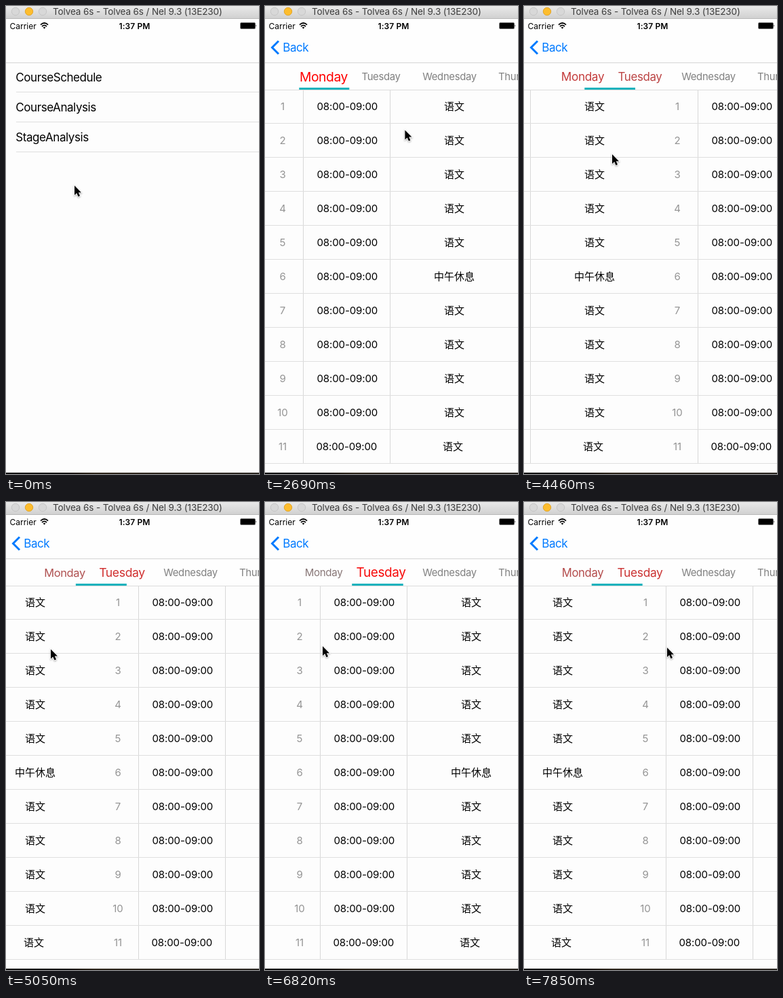
An HTML page that plays this animation: 373x688 px, repeating every 8 s.

```html
<!DOCTYPE html>
<html lang="en">
<head>
<meta charset="utf-8">
<title>Course schedule</title>
<style>
html, body { margin: 0; width: 100%; height: 100%; overflow: hidden; background: #fdfdfd; }
svg { display: block; width: 373px; height: 688px; font-family: Inter, "Noto Sans CJK SC", "Noto Sans CJK", sans-serif; }
.mid { text-anchor: middle; }
.list { font-size: 17px; letter-spacing: -.43px; }
.cell { font-size: 15px; letter-spacing: -.1px; }
.cjk { font: 15px "Noto Sans CJK SC", "Noto Sans CJK", sans-serif; }
.day { font-size: 14.8px; letter-spacing: -.3px; }
</style>
</head>
<body>
<svg id="stage" viewBox="0 0 373 688">
  <defs>
    <linearGradient id="bar" x2="0" y2="1"><stop stop-color="#e9e9e9"/><stop offset="1" stop-color="#d1d1d1"/></linearGradient>
    <linearGradient id="dock"><stop offset=".15" stop-color="#000"/><stop offset=".35" stop-color="#2e261c"/><stop offset="1" stop-color="#2c2823"/></linearGradient>
  </defs>
  <rect width="373" height="688" fill="#fdfdfd"/>
  <g id="menu"></g>
  <rect id="dim" y="84" width="373" height="602"/>
  <g id="page">
    <rect y="84" width="373" height="602" fill="#fdfdfd"/>
    <g id="schedule">
      <g id="grid"></g>
      <rect y="84" width="373" height="39" fill="#fefefe"/>
      <rect y="123" width="373" height="1" fill="#dcdcdc"/>
      <g id="days"></g>
      <rect id="mark" y="120" height="3" fill="#17b2bc"/>
    </g>
  </g>
  <rect y="19" width="373" height="64" fill="#fefefe"/>
  <rect y="83" width="373" height="1" fill="#d5d5d5"/>
  <path id="chevron" d="M20 51.5L10.5 61L20 70.5" fill="none" stroke="#007aff" stroke-width="3"/>
  <text id="back" class="list" y="67" fill="#007aff">Back</text>

  <rect width="373" height="18" fill="url(#bar)"/>
  <rect y="18" width="373" height="1" fill="#b9b9b9"/>
  <g stroke-width="1">
    <circle cx="14" cy="8" r="5.7" fill="#d8d8d8" stroke="#c6c6c6"/>
    <circle cx="34" cy="8" r="5.7" fill="#fdbd2e" stroke="#e2a62b"/>
    <circle cx="54" cy="8" r="5.7" fill="#d8d8d8" stroke="#c6c6c6"/>
  </g>
  <text x="69" y="13" font-size="13.5" letter-spacing="-.12" fill="#3c3c3c">Tolvea 6s - Tolvea 6s / Nel 9.3 (13E230)</text>
  <text x="5.5" y="34" font-size="12">Carrier</text>
  <g fill="none" stroke="#000" stroke-width="1.7">
    <path d="M51 27.6Q56.5 22.4 62 27.6M53 30Q56.5 26.8 60 30"/>
    <path d="M56.5 33.6L54.6 31.6Q56.5 30 58.4 31.6Z" fill="#000" stroke="none"/>
  </g>
  <text class="mid" x="189.5" y="34" font-size="12" font-weight="600" letter-spacing=".1">1:37 PM</text>
  <rect x="345.5" y="24.5" width="22" height="9" rx="1.5" stroke="#777"/>
  <path d="M368.5 27.3q1.6 1.7 0 3.4z"/>
  <rect y="686" width="373" height="2" fill="url(#dock)"/>
  <path id="cursor" d="M0 0V14L3.2 11L5.5 16.2L8 15.1L5.8 10.2H10Z" stroke="#fff" stroke-width="1.6" paint-order="stroke" style="filter:drop-shadow(0 1px 1px #0005)"/>
</svg>
<script>
const LOOP = 8000, STEPS = 54, PAGE = 375;
const $ = id => document.getElementById(id);

function add(parent, tag, attrs, text) {
  const el = document.createElementNS('http://www.w3.org/2000/svg', tag);
  set(el, attrs);
  if (text !== undefined) el.textContent = text;
  parent.append(el);
  return el;
}
function set(el, attrs) {
  for (const key in attrs) el.setAttribute(key, attrs[key]);
}

// Rows are [step, value, ...]; linear in between.
function at(table, step, col = 1) {
  let prev = table[0];
  for (const row of table) {
    if (row[0] >= step) {
      if (row === prev) return row[col];
      return prev[col] + (row[col] - prev[col]) * (step - prev[0]) / (row[0] - prev[0]);
    }
    prev = row;
  }
  return prev[col];
}

const pointer = [
  [0, 101, 264], [6, 166, 110], [11, 166, 110], [15, 132, 156], [16, 132, 156],
  [21, 318, 222], [22, 318, 222], [23, 305, 222], [25, 255, 221], [30, 130, 218],
  [35, 50, 216], [38, 24, 216], [39, 24, 216], [43, 59, 212], [46, 85, 212], [53, 211, 214]
];
const scroll = [
  [22, 0], [23, 4], [25, 44], [30, 175], [37, 282], [38, 330], [39, 358],
  [40, 369], [41, 374], [42, 375], [43, 375], [46, 350], [53, 222]
];
const push = [[9, 0], [10, .45], [11, .857], [12, .97], [13, 1]];
const chevronFade = [[10, 0], [11, .12], [12, .6], [13, 1]];
const PRESS = 9, LOADED = 14;

// Menu
const press = add($('menu'), 'rect', { y: 84, width: 373, height: 42, fill: '#d9d9d9' });
['CourseSchedule', 'CourseAnalysis', 'StageAnalysis'].forEach((name, i) => {
  add($('menu'), 'text', { class: 'list', x: 14.3, y: 111 + 44 * i }, name);
  add($('menu'), 'rect', { x: 15, y: 126 + 44 * i, width: 480, height: 1, fill: '#dfdfdf' });
});

// Schedule pages
const ROWS = 11;
for (let i = 1; i <= ROWS; i++)
  add($('schedule'), 'rect', { y: 122 + 50 * i, width: 373, height: 1, fill: '#dfdfdf' });
const pages = [0, 1].map(() => {
  const g = add($('grid'), 'g', {});
  for (const x of [56, 184]) add(g, 'rect', { x, y: 123, width: 1, height: 550, fill: '#d8d8d8' });
  for (let i = 1; i <= ROWS; i++) {
    const y = 103 + 50 * i, nudge = i === ROWS ? 1 : 0;
    add(g, 'text', { class: 'cell mid', x: 26, y, fill: '#949494' }, i);
    add(g, 'text', { class: 'cell mid', x: 121.3 - nudge, y }, '08:00-09:00');
    add(g, 'text', { class: 'cjk mid', x: 279 - 2 * nudge, y }, i === 6 ? '中午休息' : '语文');
  }
  return g;
});

// Day tabs
const days = [['Monday', 86.5], ['Tuesday', 171], ['Wednesday', 272], ['Thursday', 375.8]].map(([name, x]) => {
  const el = add($('days'), 'text', { class: 'day mid', y: 5.4, fill: '#808080' }, name);
  return { el, x };
});
function drawDay({ el, x }, amount) {
  const red = Math.round(128 + 127 * amount), rest = Math.round(128 * (1 - amount));
  set(el, {
    transform: `translate(${x} 103.5) scale(${1 + .3 * amount})`,
    fill: `rgb(${red},${rest},${rest})`
  });
}

function draw(step) {
  const p = at(push, step);
  set($('menu'), { transform: `translate(${-112 * p} 0)` });
  set(press, { opacity: step >= PRESS ? 1 : 0 });
  set($('dim'), { opacity: .1 * p });
  set($('page'), { transform: `translate(${Math.round(373 * (1 - p))} 0)`, opacity: p > 0 ? 1 : 0 });
  set($('schedule'), { opacity: step >= LOADED ? 1 : 0 });
  set($('back'), { x: 26.2 + 147 * (1 - p), opacity: p });
  set($('chevron'), { opacity: at(chevronFade, step) });

  const s = Math.round(at(scroll, step)), part = s / PAGE;
  pages.forEach((g, i) => set(g, { transform: `translate(${i * PAGE - s} 0)` }));
  days.forEach((day, i) => drawDay(day, Math.max(0, 1 - Math.abs(i - part))));
  set($('mark'), { x: 50.3 + 83.5 * part, width: 74 + 1.6 * part });

  set($('cursor'), { transform: `translate(${at(pointer, step)} ${at(pointer, step, 2)})` });
}

const start = performance.now();
let shown = -1;
function tick() {
  const time = (performance.now() - start) % LOOP;
  const step = Math.floor((time + 3) * STEPS / LOOP) % STEPS;
  if (step !== shown) draw(shown = step);
  requestAnimationFrame(tick);
}
tick();
</script>
</body>
</html>
```
